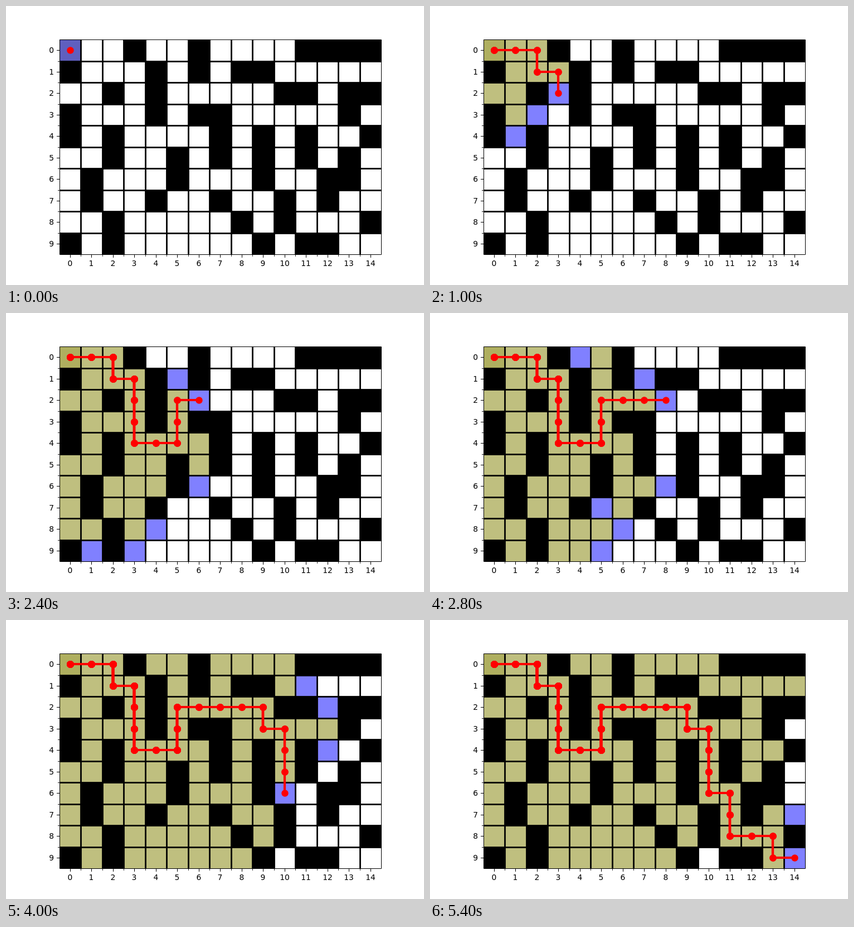
Recreate the animation shown at these times as an HTML page with a canvas. Size 750 by 500 pixels, loop 5.6 s.

```html
<!DOCTYPE html>
<html lang="en">
<head>
<meta charset="utf-8">
<title>Breadth-first search in a grid maze</title>
<style>
html, body { margin: 0; width: 100%; height: 100%; overflow: hidden; background: #fff; }
canvas { display: block; }
</style>
</head>
<body>
<canvas id="stage" width="750" height="500"></canvas>
<script>
const MAZE = [
  '...#..#....####',
  '#...#.#.##.....',
  '..#.#.....##.##',
  '#...#.##.....#.',
  '#.#....#.#.#..#',
  '..#..#.#.#.#.#.',
  '.#...#...#..##.',
  '.#..#..#..#.#..',
  '..#.....#.#...#',
  '#.#......#.##..'
];
const ROUTE = 'RRDRDDDRRUURRRRDRDDDRDDRRDR';
const COLS = 15, ROWS = 10, CELL = 38.5, LEFT = 95.625, TOP = 60;
const STEP_MS = 200, STEPS = ROUTE.length + 1;
const MOVES = { R: [1, 0], L: [-1, 0], D: [0, 1], U: [0, -1] };
const ctx = document.getElementById('stage').getContext('2d');

const edgeX = col => Math.round(LEFT + col * CELL);
const edgeY = row => Math.round(TOP + row * CELL);

function searchDistances() {
  const dist = MAZE.map(() => Array(COLS).fill(Infinity));
  const queue = [[0, 0]];
  dist[0][0] = 0;
  for (const [x, y] of queue) {
    for (const [dx, dy] of Object.values(MOVES)) {
      const nx = x + dx, ny = y + dy;
      if (MAZE[ny]?.[nx] === '.' && dist[ny][nx] === Infinity) {
        dist[ny][nx] = dist[y][x] + 1;
        queue.push([nx, ny]);
      }
    }
  }
  return dist;
}

function routePoints() {
  let x = 0, y = 0;
  const points = [[edgeX(0.5), edgeY(0.5)]];
  for (const move of ROUTE) {
    x += MOVES[move][0];
    y += MOVES[move][1];
    points.push([edgeX(x + 0.5), edgeY(y + 0.5)]);
  }
  return points;
}

const dist = searchDistances();
const points = routePoints();

function rect(color, x, y, w, h) {
  ctx.fillStyle = color;
  ctx.fillRect(x, y, w, h);
}

function cellColor(col, row, step) {
  if (MAZE[row][col] === '#') return '#000';
  const d = dist[row][col], start = d === 0;
  if (d > step) return '#fff';
  if (d === step) return start ? '#5f5fbf' : '#8080ff';
  return start ? '#afaf5f' : '#bfbf7f';
}

function drawCells(step) {
  for (let row = 0; row < ROWS; row++) {
    for (let col = 0; col < COLS; col++) {
      const x = edgeX(col), y = edgeY(row);
      rect(cellColor(col, row, step), x, y, edgeX(col + 1) - x, edgeY(row + 1) - y);
    }
  }
}

function drawAxes() {
  const x0 = edgeX(0), x1 = edgeX(COLS), y0 = edgeY(0), y1 = edgeY(ROWS);
  const minor = 'rgba(0,0,0,.83)';
  ctx.font = '13.89px "DejaVu Sans", sans-serif';
  for (let col = 0; col < COLS; col++) {
    const x = edgeX(col + 0.5);
    rect('#000', x, y1 + 1, 1, 5);
    ctx.textAlign = 'center';
    ctx.fillText(col, x, 466);
    if (col) {
      rect('#000', edgeX(col) - 0.89, y0, 2.78, y1 - y0);
      rect(minor, edgeX(col), y1 + 1, 1, 3);
    }
  }
  for (let row = 0; row < ROWS; row++) {
    const y = edgeY(row + 0.5);
    rect('#000', x0 - 5, y, 5, 1);
    ctx.textAlign = 'right';
    ctx.fillText(row, 86, y + 5);
    if (row) {
      rect('#000', x0, edgeY(row) - 0.89, x1 - x0, 2.78);
      rect(minor, x0 - 3, edgeY(row), 3, 1);
    }
  }
}

function drawFrame() {
  const x = edgeX(0), y = edgeY(0);
  ctx.strokeStyle = '#000';
  ctx.lineWidth = 1;
  ctx.strokeRect(x + 0.5, y + 0.5, edgeX(COLS) - x, edgeY(ROWS) - y);
}

function drawRoute(length) {
  const part = points.slice(0, length + 1);
  ctx.strokeStyle = ctx.fillStyle = '#f00';
  ctx.lineWidth = 4.17;
  ctx.lineJoin = 'round';
  ctx.beginPath();
  part.forEach(([x, y]) => ctx.lineTo(x, y));
  if (length) ctx.stroke();
  for (const [x, y] of part) {
    ctx.beginPath();
    ctx.arc(x + 0.5, y + 0.5, 6.25, 0, 2 * Math.PI);
    ctx.fill();
  }
}

function draw(step) {
  rect('#fff', 0, 0, 750, 500);
  drawCells(step);
  drawAxes();
  // Each step paints over the earlier ones, so older strokes get heavier edges.
  for (let i = 0; i <= step; i++) drawRoute(i);
  drawFrame();
}

const began = performance.now();
let shown = -1;
function tick() {
  const step = Math.floor((performance.now() - began) / STEP_MS) % STEPS;
  if (step !== shown) draw(shown = step);
  requestAnimationFrame(tick);
}
tick();
</script>
</body>
</html>
```
